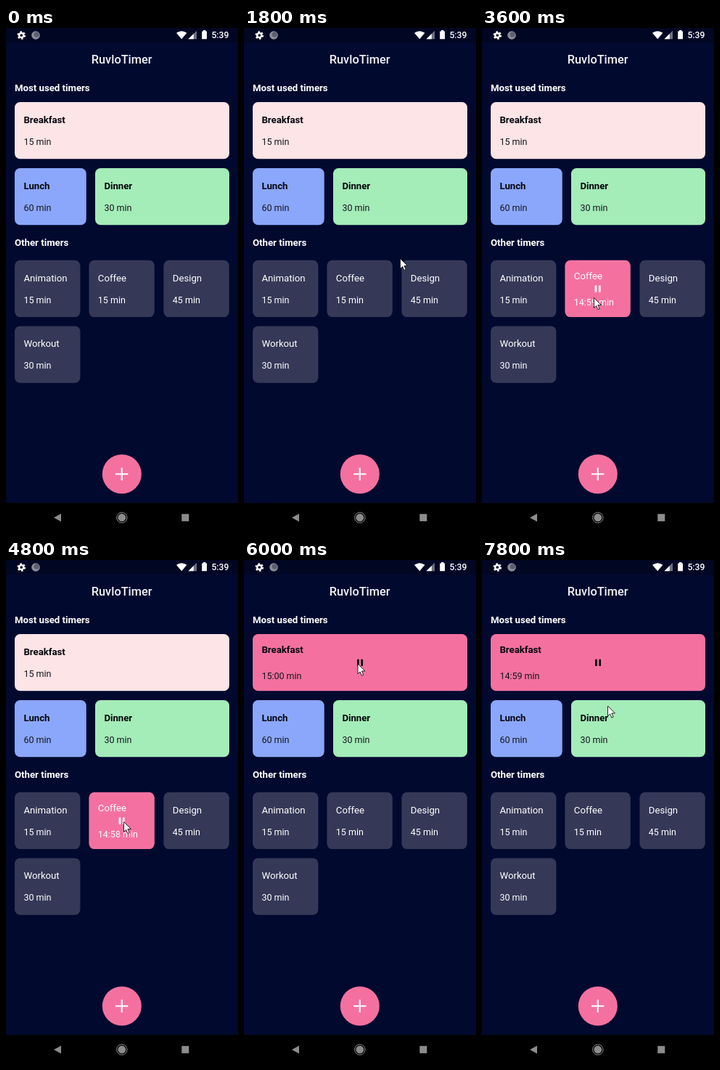
These frames come from a looping animation (320 by 694 pixels, 8 s). An HTML page:

```html
<!DOCTYPE html>
<html lang="en">
<head>
<meta charset="utf-8">
<title>Timers</title>
<style>
html, body { margin: 0; width: 100%; height: 100%; overflow: hidden; background: #01092e; }
svg { display: block; font-family: Roboto, sans-serif; }
.title { font-size: 16.35px; font-weight: 500; fill: #f1f2f8; }
.head { font-size: 13.2px; font-weight: 700; fill: #fff; }
.name { font-size: 13.2px; }
.time { font-size: 12.5px; }
.clock { font-size: 12.2px; font-weight: 500; fill: #fff; }
</style>
</head>
<body>
<svg id="stage" width="320" height="694" viewBox="0 0 320 694">
  <rect width="320" height="694" fill="#01092e"/>
  <rect width="320" height="20" fill="#010623"/>
  <rect y="654" width="320" height="40" fill="#000"/>

  <g id="status" fill="#fff">
    <circle cx="21.2" cy="10" r="3.1" fill="none" stroke="#fff" stroke-width="2.5"/>
    <circle cx="21.2" cy="10" r="4.9" fill="none" stroke="#fff" stroke-width="1.8" stroke-dasharray="2.6 2.53"/>
    <circle cx="41" cy="10" r="5.8" fill="#8b8d98"/>
    <circle cx="42.2" cy="8.9" r="3.6" fill="#5c5f70"/>
    <path d="M235 6.8Q242.2 1.6 249.4 6.8L242.2 15.2Z"/>
    <path d="M251.5 15.2L263 3.8V15.2Z" fill="#6d7081"/>
    <path d="M251.5 15.2L258.8 8V15.2Z"/>
    <path d="M272 3h3.4v1.4h1.6v10.8h-6.8V4.4h1.8z"/>
    <text class="clock" x="283.4" y="14.2">5:39</text>
  </g>

  <text class="title" x="159.7" y="49" text-anchor="middle">RuvloTimer</text>
  <text class="head" x="12" y="86.5">Most used timers</text>
  <text class="head" x="12" y="300">Other timers</text>
  <g id="cards"></g>

  <circle cx="159.8" cy="614.2" r="27" fill="#f4719f"/>
  <path d="M151 614.2h17.4M159.7 605.5v17.4" stroke="#fff" stroke-width="2.1"/>

  <g fill="#8c8c8c">
    <path d="M66 674.2L76 668.7V679.7Z"/>
    <circle cx="159.8" cy="674.2" r="5.4"/>
    <circle cx="159.8" cy="674.2" r="7.2" fill="none" stroke="#8c8c8c"/>
    <rect x="242.3" y="669.2" width="10" height="10"/>
  </g>

  <path id="cursor" d="M.5 .5V14.3L3.6 11.4L5.9 16.6L8.2 15.6L5.9 10.5H10.4Z"
    fill="#fff" stroke="#111" stroke-width=".9" stroke-linejoin="round"/>
</svg>
<script>
const LOOP = 8000, STEP = 200;
const DARK = '#353857', PINK = '#f4719f';

// name, minutes, x, y, width, fill, [start, stop] while running
const timers = [
  ['Breakfast', 15, 12, 102, 296, '#fde4e6', [6000, LOOP]],
  ['Lunch', 60, 12, 193, 98.7, '#8ba7fb'],
  ['Dinner', 30, 123, 193, 185, '#a4ecb8'],
  ['Animation', 15, 12, 319.8, 90.4, DARK],
  ['Coffee', 15, 114.4, 319.8, 90.4, DARK, [2400, 5200]],
  ['Design', 45, 217.4, 319.8, 90.4, DARK],
  ['Workout', 30, 12, 410.4, 90.4, DARK]
];

// time, x, y of the pointer tip
const path = [
  [1600, 284, 252], [1800, 215, 317], [2200, 154, 371], [4000, 154, 371],
  [4600, 162, 360], [5200, 162, 360], [5600, 156.5, 146], [5800, 156.5, 142.5],
  [6000, 156.5, 142.5], [6200, 165, 178], [6400, 170, 200], [7200, 170, 205],
  [7600, 170, 205], [7800, 173, 200.5]
];

function add(parent, tag, attrs, text = '') {
  const node = document.createElementNS('http://www.w3.org/2000/svg', tag);
  for (const key in attrs) node.setAttribute(key, attrs[key]);
  node.textContent = text;
  return parent.appendChild(node);
}

function makeCard([name, minutes, x, y, width, fill, run]) {
  const root = document.getElementById('cards');
  const dark = fill === DARK, ink = dark ? '#fff' : '#05060c';
  const tx = x + 12.4;
  const box = add(root, 'rect', { x, y, width, height: 78.3, rx: 7.5, fill });
  const label = add(root, 'text', {
    class: 'name', x: tx, fill: ink, 'font-weight': dark ? 400 : 700
  }, name);
  const time = add(root, 'text', { class: 'time', x: tx, fill: dark ? '#fff' : '#15161c' });
  const mx = x + width / 2, my = y + 39.4;
  const pause = add(root, 'path', {
    d: `M${mx - 4} ${my - 4.6}h2.7v9.2h-2.7zM${mx + 1.3} ${my - 4.6}h2.7v9.2h-2.7z`, fill: ink
  });

  return now => {
    const on = !!run && now >= run[0] && now < run[1];
    const left = on ? minutes * 60 - Math.floor((now - run[0]) / 1000) : 0;
    const clock = `${Math.floor(left / 60)}:${String(left % 60).padStart(2, '0')}`;
    box.setAttribute('fill', on ? PINK : fill);
    label.setAttribute('y', y + (on ? 25.7 : 28.8));
    time.setAttribute('y', y + (on ? 62 : 58.8));
    time.textContent = `${on ? clock : minutes} min`;
    pause.setAttribute('visibility', on ? 'visible' : 'hidden');
  };
}

const cards = timers.map(makeCard);
const cursor = document.getElementById('cursor');

function moveCursor(now) {
  const shown = now >= path[0][0];
  cursor.setAttribute('visibility', shown ? 'visible' : 'hidden');
  if (!shown) return;
  const next = path.findIndex(p => p[0] > now);
  const b = next < 0 ? path[path.length - 1] : path[next];
  const a = next < 0 ? b : path[next - 1];
  const k = a === b ? 0 : (now - a[0]) / (b[0] - a[0]);
  const at = i => a[i] + (b[i] - a[i]) * k;
  cursor.setAttribute('transform', `translate(${at(1)} ${at(2)})`);
}

function draw(now) {
  const t = Math.floor(now % LOOP / STEP) * STEP;
  cards.forEach(update => update(t));
  moveCursor(t);
}

const begin = performance.now();
function tick() {
  draw(performance.now() - begin);
  requestAnimationFrame(tick);
}
tick();
</script>
</body>
</html>
```
